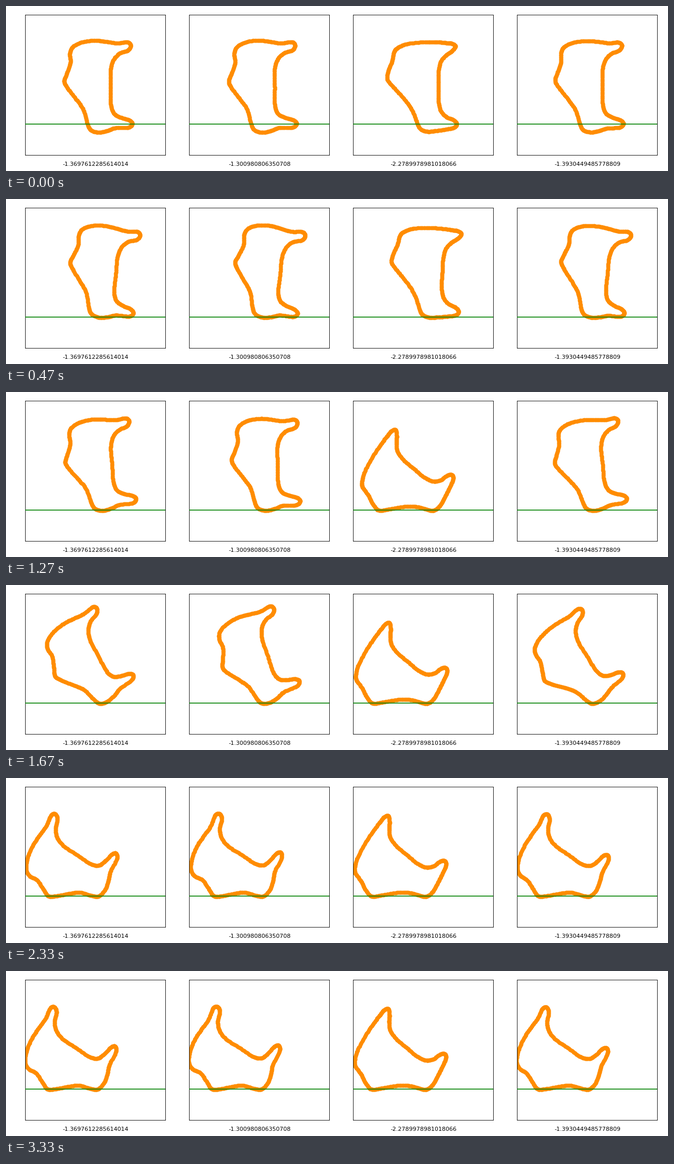
Write a matplotlib script that moves like this. It is 1280 px wide and 320 px high and loops after 3.36 s.

```python
import numpy as np
import matplotlib.pyplot as plt
from matplotlib.animation import FuncAnimation

STAGE_W, STAGE_H, DPI = 1280, 320, 80
FRAMES, LOOP_MS = 101, 3360

# Panel geometry in stage pixels, and the data range each panel shows
LEFT, PITCH, WIDTH = 37.45, 317, 271
TOP, BOTTOM = 17.0, 289.4
LABEL_X, LABEL_Y = 135.9, 310.5
XLIM, YLIM = (-5, 5), (-2, 7)
UNIT_X = WIDTH / (XLIM[1] - XLIM[0])
UNIT_Y = (BOTTOM - TOP) / (YLIM[1] - YLIM[0])

HALF_STROKE = 3.9
FLOOR = -0.035
HEEL_RADIUS = 0.6
SLIDE, SLIDE_TAU = 14.5 / UNIT_X, 6.5
SINK_TAU = 2.5

# Key points of two outlines, in pixels from the panel's left and the stage's top.
# Points pair up, so every body is a blend of the two.
CURVY = np.array([
    (134, 67), (155, 69), (177, 72), (197, 70), (203.5, 76.5), (198, 86),
    (182, 92), (170, 105), (164.5, 126), (165, 158), (165, 190), (171, 208),
    (184, 216), (200, 221), (206.5, 228), (199, 235.5), (174, 236.5), (158, 242),
    (141, 245), (126, 240), (119.5, 227), (112, 201), (99, 182), (82, 160),
    (75, 146), (80, 131), (87, 110), (86, 92), (92, 79), (110, 70)])
PLAIN = np.array([
    (136, 70), (162, 70), (180, 71.5), (190, 72.5), (197.5, 78), (190, 88),
    (180, 95), (169, 108), (164.5, 130), (164.5, 156), (164.5, 182), (169, 203),
    (180, 215), (194, 221), (200, 229), (194, 236), (177, 239.5), (160, 242),
    (145, 243.5), (132, 240), (125, 231), (116, 207), (103, 186), (82, 162),
    (66, 143), (68, 125), (75, 107), (79, 89), (86, 81), (104, 73.5)])


def smooth(b, steps=14):
    """Closed Catmull-Rom curve through the points."""
    a, c, d = np.roll(b, 1, 0), np.roll(b, -1, 0), np.roll(b, -2, 0)
    t = (np.arange(steps) / steps)[:, None, None]
    curve = 0.5 * (2 * b + (c - a) * t + (2 * a - 5 * b + 4 * c - d) * t**2
                   + (3 * b - a - 3 * c + d) * t**3)
    return curve.transpose(1, 0, 2).reshape(-1, 2)


def to_x(px):
    return px / UNIT_X + XLIM[0]


def rotate(shape, degrees):
    c, s = np.cos(np.radians(degrees)), np.sin(np.radians(degrees))
    return shape @ np.array([[c, s], [-s, c]])


class Body:
    """A rigid outline that pops out of the ground, topples and slides."""

    def __init__(self, blend, amp, rate, turn, final_edge):
        px = smooth(CURVY + blend * (PLAIN - CURVY))
        shape = np.column_stack([to_x(px[:, 0]),
                                 (BOTTOM - px[:, 1]) / UNIT_Y + YLIM[0]])
        low = shape[shape[:, 1].argmin()]
        self.start, self.depth = low[0], FLOOR - low[1]
        self.shape = shape - (low + [0, HEEL_RADIUS])

        self.amp, self.rate, self.turn = amp, rate, turn
        self.rest = self.settled_angle()
        self.land = turn + np.arccosh(self.rest / amp + np.cosh(rate * turn)) / rate
        reach = rotate(self.shape, self.rest)[:, 0].max()
        self.final = to_x(final_edge - HALF_STROKE) - reach

    def settled_angle(self):
        """The tilt where the body rests lowest."""
        def height(angle):
            y = rotate(self.shape, angle)[:, 1]
            return y.mean() - y.min()
        return min(np.linspace(45, 70, 501), key=height)

    def angle(self, t):
        """Inverted pendulum: kicked one way, falling back the other."""
        swing = np.cosh(self.rate * (t - self.turn)) - np.cosh(self.rate * self.turn)
        return min(self.amp * swing, self.rest)

    def heel(self, t):
        """Drifts right until landing, then slides back and slows down."""
        if t < self.land:
            return self.start + (self.final + SLIDE - self.start) * t / self.land
        return self.final + SLIDE * np.exp((self.land - t) / SLIDE_TAU)

    def pose(self, t):
        x, y = rotate(self.shape, self.angle(t)).T
        sink = self.depth * np.exp(-t / SINK_TAU)
        return x + self.heel(t), y - y.min() + FLOOR - sink


bodies = [
    Body(0, amp=7.4, rate=0.075, turn=17, final_edge=179.5),
    Body(-0.12, amp=10.8, rate=0.062, turn=18.5, final_edge=179),
    Body(1, amp=14.8, rate=0.08, turn=9.4, final_edge=183),
    Body(0.2, amp=7.9, rate=0.075, turn=16.5, final_edge=179),
]
labels = ["-1.3697612285614014", "-1.300980806350708",
          "-2.2789978981018066", "-1.3930449485778809"]

plt.rcParams["font.family"] = "DejaVu Sans"
fig = plt.figure(figsize=(STAGE_W / DPI, STAGE_H / DPI), dpi=DPI, facecolor="white")

dots = []
for i, label in enumerate(labels):
    left = LEFT + PITCH * i
    ax = fig.add_axes([left / STAGE_W, 1 - BOTTOM / STAGE_H,
                       WIDTH / STAGE_W, (BOTTOM - TOP) / STAGE_H])
    ax.set(xlim=XLIM, ylim=YLIM, xticks=[], yticks=[])
    dots += ax.plot([], [], "o", color="darkorange", markersize=6)
    ax.axhline(0, color="green", linewidth=1.5, zorder=3)
    fig.text((left + LABEL_X) / STAGE_W, 1 - LABEL_Y / STAGE_H, label,
             fontsize=10, ha="center", va="baseline")


def update(frame):
    for body, line in zip(bodies, dots):
        line.set_data(*body.pose(frame))
    return dots


anim = FuncAnimation(fig, update, frames=FRAMES, interval=LOOP_MS / FRAMES,
                     repeat=True, repeat_delay=0, blit=False)
plt.show()
```
